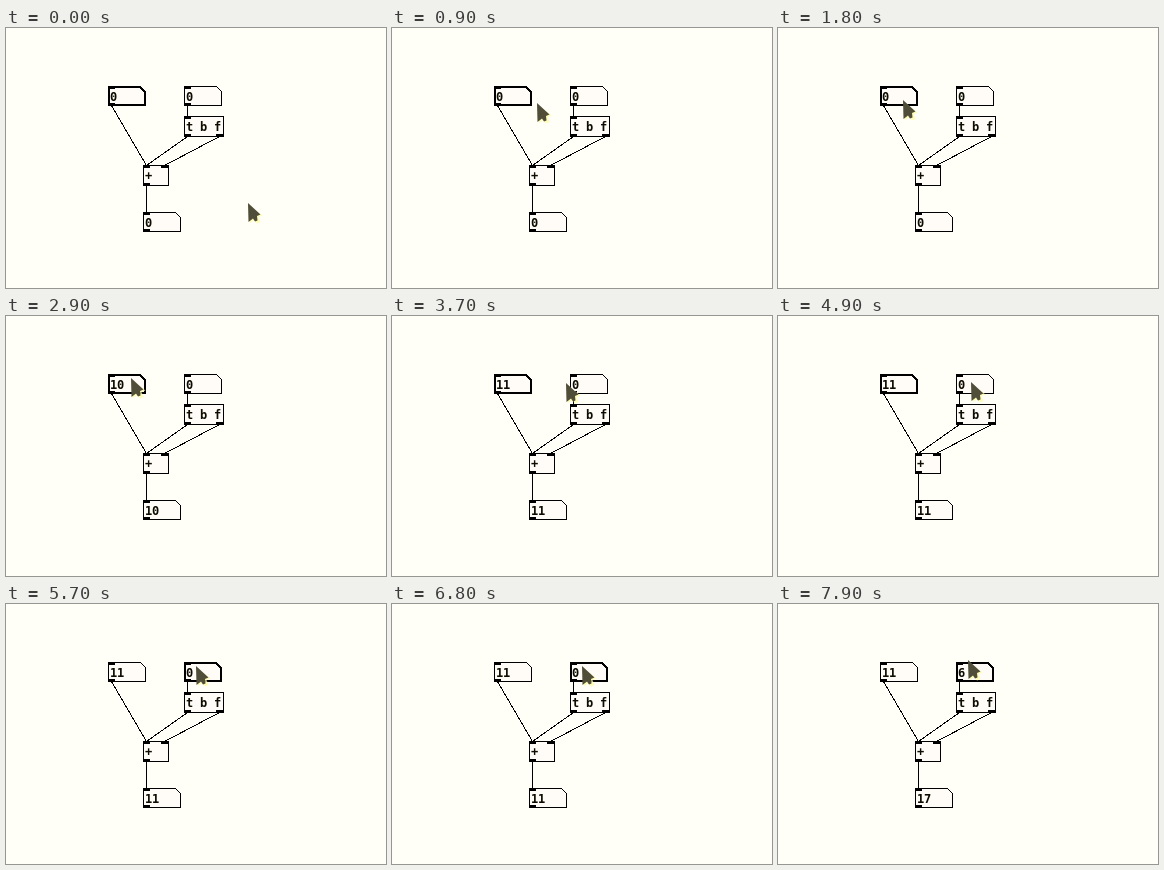
Animation of 380 by 260 pixels, one loop 8 s. Source, as an HTML page:

```html
<!DOCTYPE html>
<html lang="en">
<head>
<meta charset="utf-8">
<title>Adding two numbers</title>
<style>
  html, body { margin: 0; width: 100%; height: 100%; overflow: hidden; background: #fffff8; }
  svg { display: block; width: 380px; height: 260px; }
  text { font: bold 12px "DejaVu Sans Mono", monospace; letter-spacing: -.22px; fill: #0c0c00; white-space: pre; }
  .box { fill: #fffcf8; stroke: #000; shape-rendering: crispEdges; }
  .wire { fill: none; stroke: #000; shape-rendering: crispEdges; }
</style>
</head>
<body>
<svg viewBox="0 0 380 260">
  <g id="patch"></g>
  <g id="cursor">
    <path d="M1 2L14.5 12.5L10.5 14L12.5 19L9 20.5L6.5 17L2 20Z" fill="#fffca0" opacity=".75"/>
    <path d="M0 0L12.5 11.5L9 13L9.5 17.5L7 18.5L5 15.5L.5 19Z" fill="#504e38"/>
  </g>
</svg>
<script>
const NS = "http://www.w3.org/2000/svg";
const LOOP = 8000, STEP = 100;
const patch = document.getElementById("patch");
const cursor = document.getElementById("cursor");

function add(tag, attrs, content = "") {
  const el = document.createElementNS(NS, tag);
  for (const k in attrs) el.setAttribute(k, attrs[k]);
  el.textContent = content;
  return patch.appendChild(el);
}
const port = (x, y) => add("rect", { x, y, width: 7, height: 3 });
const label = (x, y, s) => add("text", { x, y }, s);

function numberBox(x, y) {
  const frame = add("path", { class: "box" });
  port(x, y);
  port(x, y + 17);
  const text = label(x + 2, y + 15, "0");
  // the stroke grows inwards, so the outer size stays the same
  const setWidth = w => {
    const e = w / 2;
    frame.setAttribute("stroke-width", w);
    frame.setAttribute("d", `M${x + e} ${y + e}h${33 - w}l5 5v${15 - w}h${w - 38}z`);
  };
  setWidth(1);
  return { setWidth, text };
}

function objectBox(x, y, w, s, ins, outs) {
  add("rect", { class: "box", x: x + .5, y: y + .5, width: w, height: 20 });
  ins.forEach(dx => port(x + dx, y));
  outs.forEach(dx => port(x + dx, y + 18));
  label(x + 2, y + 15, s);
}

add("path", {
  class: "wire",
  d: "M105.5 77.5L140.5 137.5M181.5 77V89M181.5 108.5L140.5 137.5M213.5 108.5L158.5 137.5M140.5 157V185"
});
const left = numberBox(102, 58);
const right = numberBox(178, 58);
const sum = numberBox(137, 184);
objectBox(178, 88, 39, "t b f", [0], [0, 32]);
objectBox(137, 137, 25, "+", [0, 18], [0]);

const smooth = u => u * u * (3 - 2 * u);

// keys: [time, ...values], eased between neighbours
function track(keys, t) {
  let i = 0;
  while (i < keys.length - 2 && t >= keys[i + 1][0]) i++;
  const a = keys[i], b = keys[i + 1];
  const u = smooth(Math.min(1, Math.max(0, (t - a[0]) / (b[0] - a[0]))));
  return a.slice(1).map((v, j) => v + (b[j + 1] - v) * u);
}

const path = [
  [0, 242, 175], [900, 145, 75], [1800, 125, 72], [3600, 125, 72],
  [3700, 174, 67], [4000, 291, 101], [4200, 291, 101],
  [4900, 193, 66], [5000, 190, 62], [8000, 190, 62]
];
const leftDrag = [[1800, 0], [3200, 11]];
const rightDrag = [[6800, 0], [7100, 4], [7500, 4], [7900, 6]];

function draw(t) {
  const a = Math.round(track(leftDrag, t)[0]);
  const b = Math.round(track(rightDrag, t)[0]);
  let [x, y] = track(path, t);
  // dragging lifts the pointer one pixel per unit
  if (t < 3700) y -= a;
  y -= b;

  left.text.textContent = a;
  right.text.textContent = b;
  sum.text.textContent = a + b;
  const onRight = t >= 5400;
  left.setWidth(onRight ? 1 : 2);
  right.setWidth(onRight ? 2 : 1);
  cursor.setAttribute("transform", `translate(${Math.round(x)} ${Math.round(y)})`);
}

const start = performance.now();
function tick() {
  const t = (performance.now() - start) % LOOP;
  draw(Math.floor(t / STEP) * STEP);
  requestAnimationFrame(tick);
}
draw(0);
requestAnimationFrame(tick);
</script>
</body>
</html>
```
